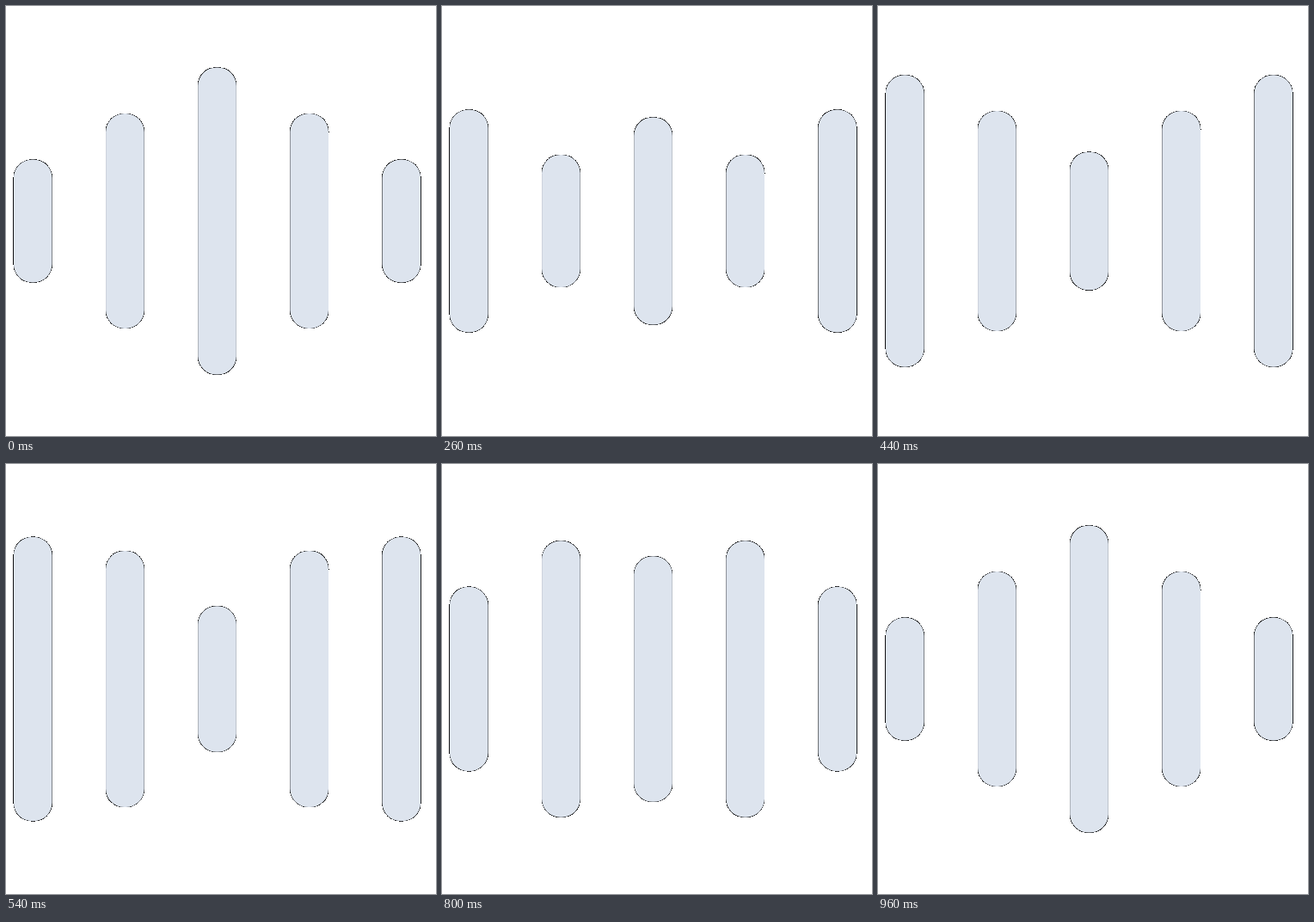
An HTML page with a canvas that plays this animation: 500x500 px, repeating every 980 ms.

```html
<!DOCTYPE html>
<html lang="en">
<head>
<meta charset="utf-8">
<title>Bars</title>
<style>
  html, body { margin: 0; width: 100%; height: 100%; overflow: hidden; background: #fff; }
  canvas { display: block; }
</style>
</head>
<body>
<canvas id="stage" width="500" height="500"></canvas>
<script>
const SIZE = 500;
const UNIT = SIZE / 140;
const LEFT = 2.5;
const PITCH = 30;
const BAR_WIDTH = 12.5;
const RADIUS = 6;
const LOOP = 980;
const STEP = 20;
const CYCLE = 960;

// Bar heights at equally spaced moments of the cycle.
const outer = [40, 100, 40];
const inner = [70, 40, 78, 100, 70];
const middle = [100, 40, 100];
const bars = [outer, inner, middle, inner, outer];

const ctx = document.getElementById('stage').getContext('2d', { willReadFrequently: true });
const start = performance.now();

function interpolate(values, progress) {
  const position = progress * (values.length - 1);
  const i = Math.min(Math.floor(position), values.length - 2);
  return values[i] + (values[i + 1] - values[i]) * (position - i);
}

// Soft edge pixels sit on black, everything outside the shapes is white.
function darkenEdges() {
  const image = ctx.getImageData(0, 0, SIZE, SIZE);
  const data = image.data;
  for (let i = 0; i < data.length; i += 4) {
    const alpha = data[i + 3];
    if (alpha === 255) continue;
    for (let c = i; c < i + 3; c++) {
      data[c] = alpha > 2 ? data[c] * alpha / 255 : 255;
    }
    data[i + 3] = 255;
  }
  ctx.putImageData(image, 0, 0);
}

function draw(time) {
  const progress = Math.min(time / CYCLE, 1);
  ctx.clearRect(0, 0, SIZE, SIZE);
  ctx.fillStyle = '#dde4ee';
  bars.forEach((heights, i) => {
    const height = interpolate(heights, progress) * UNIT;
    ctx.beginPath();
    ctx.roundRect((LEFT + i * PITCH) * UNIT, (SIZE - height) / 2,
      BAR_WIDTH * UNIT, height, RADIUS * UNIT);
    ctx.fill();
  });
  darkenEdges();
}

let shown = -1;
function tick() {
  const elapsed = (performance.now() - start) % LOOP;
  const time = Math.floor(elapsed / STEP) * STEP;
  if (time !== shown) draw(shown = time);
  requestAnimationFrame(tick);
}
tick();
</script>
</body>
</html>
```
